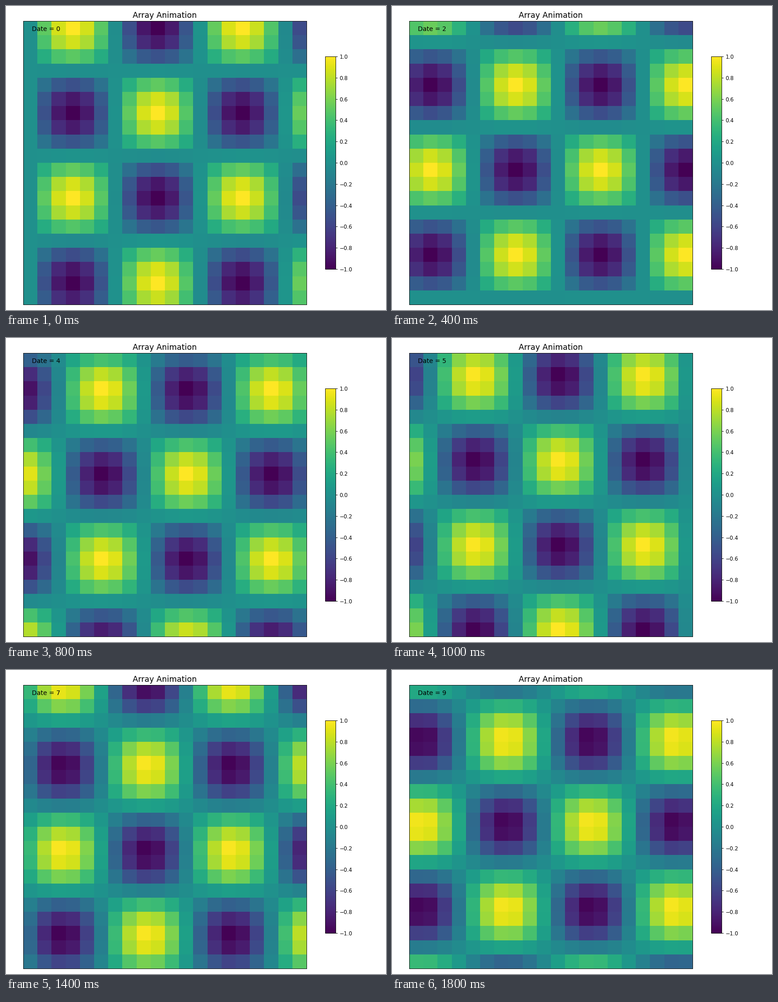
Recreate the animation shown at these times as a matplotlib script. Size 837 by 669 pixels, loop 2 s.

```python
import numpy as np
import matplotlib.pyplot as plt
from matplotlib.animation import FuncAnimation

W, H, DPI = 837, 669, 96
UNIT = 0.871  # scale for point sizes at this dpi
FRAMES, INTERVAL = 10, 200
STEP = 0.5  # phase advance per date

plt.rcParams["font.family"] = "DejaVu Sans"
plt.rcParams["axes.linewidth"] = 0.8 * UNIT

fig = plt.figure(figsize=(W / DPI, H / DPI), dpi=DPI, facecolor="white")


def add_axes(left, top, right, bottom):
    """Axes placed by pixel edges, measured from the top left."""
    return fig.add_axes([left / W, 1 - bottom / H, (right - left) / W, (bottom - top) / H])


grid = np.linspace(0, 10, 20)


def field(date):
    phase = date * STEP
    return np.sin(grid[None, :] + phase) * np.cos(grid[:, None] + phase)


ax = add_axes(38.1, 33, 662.1, 656.8)
image = ax.imshow(field(0), cmap="viridis", vmin=-1, vmax=1,
                  aspect="auto", interpolation="nearest")
ax.set_xticks([])
ax.set_yticks([])
ax.set_title("Array Animation", fontsize=15 * UNIT, pad=6 * UNIT)
label = ax.text(0.03, 0.965, "Date = 0", transform=ax.transAxes, fontsize=12 * UNIT)

bar = fig.colorbar(image, cax=add_axes(703, 111.1, 726.4, 578.9))
bar.set_ticks(np.linspace(-1, 1, 11))
bar.ax.tick_params(labelsize=10 * UNIT, length=3.5 * UNIT,
                   width=0.8 * UNIT, pad=3.5 * UNIT)


def update(date):
    image.set_data(field(date))
    label.set_text(f"Date = {date}")
    return image, label


anim = FuncAnimation(fig, update, frames=FRAMES, interval=INTERVAL,
                     repeat=True, repeat_delay=0)
plt.show()
```
